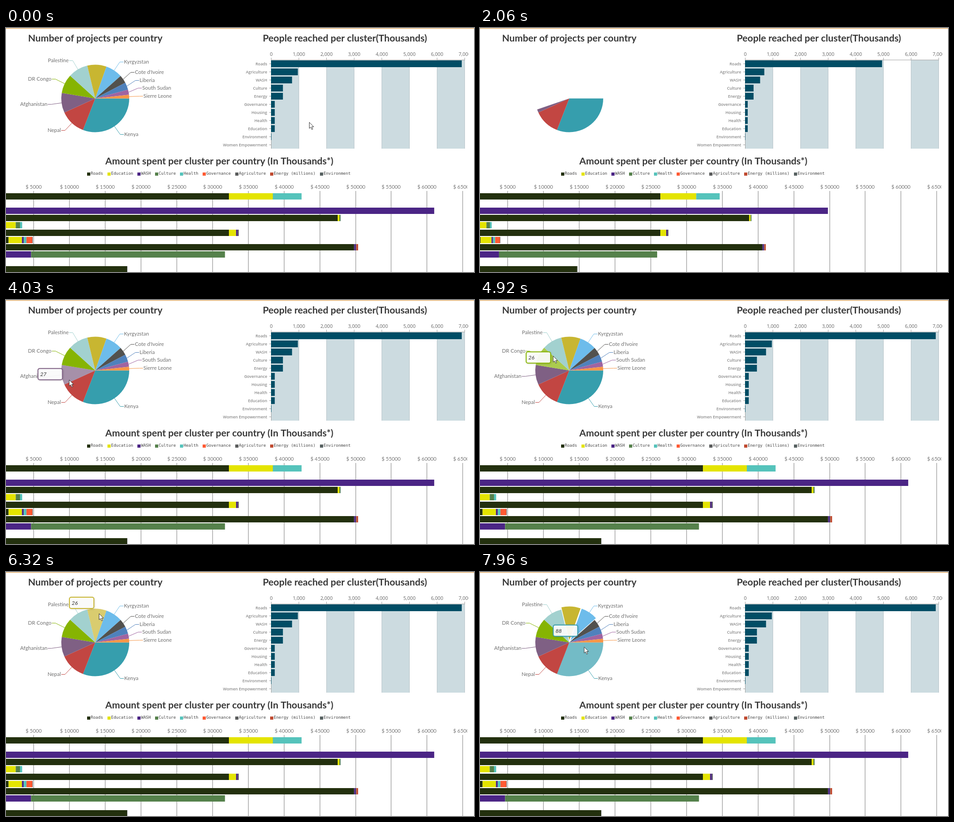
An HTML page with a canvas that plays this animation: 1033x542 px, repeating every 8 s.

```html
<!DOCTYPE html>
<html lang="en">
<head>
<meta charset="utf-8">
<title>Project dashboard</title>
<style>
  html, body { margin: 0; width: 100%; height: 100%; overflow: hidden; background: #fff; }
  canvas { display: block; }
</style>
</head>
<body>
<canvas id="stage" width="1033" height="542"></canvas>
<script>
const ctx = document.getElementById('stage').getContext('2d');
const LOOP = 8000;
const TAU = Math.PI * 2;
const TITLE = 'bold 21.15px Lato, sans-serif';
const LABEL = '11.5px Lato, sans-serif';
const TICK = '10.7px "Open Sans", sans-serif';
const ROW = '600 8.8px "Open Sans", sans-serif';
const LEGEND = '9px "DejaVu Sans Mono", monospace';

const clamp = v => Math.max(0, Math.min(1, v));
const progress = (t, start, length) => clamp((t - start) / length);
const easeOutQuart = p => 1 - (1 - p) ** 4;

// Times at which the charts are cleared and drawn again
const CLEARED = 1450, REDRAWN = 1510;
const PIE_START = 1508, PIE_TIME = 1237;
const SPEND_START = 1647, REACH_START = 1735, BAR_TIME = 1200;

const PIE = { x: 197, y: 156.5, r: 75 };
const clicks = { 'Timor Leste': 6480, 'Kyrgyzstan': 7280 };
const slices = [
  ['Kenya', 88, '#369ead'], ['Nepal', 35, '#c24642'], ['Afghanistan', 27, '#7f6084'],
  ['DR Congo', 26, '#86b402'], ['Palestine', 27, '#a2d1cf'], ['Timor Leste', 26, '#c8b631'],
  ['Kyrgyzstan', 23, '#6dbceb'], ["Cote d'Ivoire", 11, '#52514e'], ['Liberia', 10, '#4f81bc'],
  ['South Sudan', 7, '#a064a1'], ['Sierre Leone', 5, '#f79647']
].map(([name, value, color]) => ({ name, value, color }));

const reach = {
  'Roads': 6900, 'Agriculture': 970, 'WASH': 760, 'Culture': 430, 'Energy': 430,
  'Governance': 135, 'Housing': 135, 'Health': 135, 'Education': 135,
  'Environment': 15, 'Women Empowerment': 0
};

const clusters = {
  'Roads': '#23300e', 'Education': '#e4e400', 'WASH': '#4b2585', 'Culture': '#55814b',
  'Health': '#55c3bb', 'Governance': '#ff5a33', 'Agriculture': '#5a5c5c',
  'Energy (millions)': '#c04a30', 'Environment': '#566060'
};

// One stacked bar per country, in thousands of dollars
const spending = [
  { Roads: 32.3, Education: 6.14, Health: 4.02 },
  {},
  { WASH: 61 },
  { Roads: 47.5, Education: .25, Culture: .16 },
  { Education: 2.5, Culture: .6, Health: .3 },
  { Roads: 32.3, Education: 1, WASH: .25, Agriculture: .13 },
  { Roads: 1.5, Education: 1.87, WASH: .25, Health: .38, Governance: .82, Agriculture: .06 },
  { Roads: 49.8, WASH: .25, Agriculture: .06, 'Energy (millions)': .25 },
  { WASH: 4.65, Culture: 27.1 },
  {},
  { Roads: 18.05, Agriculture: .06 }
];

// time, x, y of the pointer tip
const pointerPath = [
  [0, 669, 209], [69, 669, 209], [70, 314, 10], [150, 314, 10], [430, 137, 0],
  [500, 137, -25], [2500, -30, -25], [2660, -8, 28], [3080, -6, 73], [3830, 129, 209],
  [4050, 140, 174], [4400, 178, 203], [4720, 178, 203], [4920, 161, 124], [5300, 195, 106],
  [5500, 181, 106], [6000, 213, 94], [6200, 205, 92], [6500, 205, 92], [7030, 238, 108],
  [7330, 238, 108], [7700, 219, 120], [8000, 231, 173]
];

function layOutPie() {
  const total = slices.reduce((sum, s) => sum + s.value, 0);
  let angle = 0;
  for (const s of slices) {
    s.from = angle;
    s.to = angle += s.value / total * TAU;
    s.mid = (s.from + s.to) / 2;
    s.side = Math.cos(s.mid) > 0 ? 1 : -1;
  }
  // Labels sit on a wider circle; crowded ones at the upper right move up
  const radius = PIE.r * 1.3, gap = 17.5;
  let lowest = 0;
  for (const s of [...slices].reverse()) {
    s.labelY = radius * Math.sin(s.mid);
    if (s.side > 0 && s.labelY < 0) {
      s.labelY = Math.min(s.labelY, lowest);
      lowest = s.labelY - gap;
    }
    s.labelX = s.side * Math.sqrt(radius ** 2 - s.labelY ** 2);
  }
}

function pointerAt(t) {
  const i = Math.max(1, pointerPath.findIndex(k => k[0] >= t));
  const [t0, x0, y0] = pointerPath[i - 1], [t1, x1, y1] = pointerPath[i];
  const p = progress(t, t0, t1 - t0);
  return { x: x0 + (x1 - x0) * p, y: y0 + (y1 - y0) * p };
}

function rect(color, x, y, w, h) {
  ctx.fillStyle = color;
  ctx.fillRect(x, y, w, h);
}

function text(str, x, y, font, color, align = 'center') {
  ctx.font = font;
  ctx.fillStyle = color;
  ctx.textAlign = align;
  ctx.fillText(str, x, y);
}

function polyline(color, ...points) {
  ctx.beginPath();
  points.forEach(([x, y]) => ctx.lineTo(x, y));
  ctx.strokeStyle = color;
  ctx.lineWidth = 1;
  ctx.stroke();
}

function clipped(right, draw) {
  ctx.save();
  ctx.beginPath();
  ctx.rect(0, 0, right, 542);
  ctx.clip();
  draw();
  ctx.restore();
}

function sliceUnder({ x, y }) {
  const dx = x - PIE.x, dy = y - PIE.y;
  if (Math.hypot(dx, dy) > PIE.r) return null;
  const angle = (Math.atan2(dy, dx) + TAU) % TAU;
  return slices.find(s => angle < s.to);
}

function drawPie(t, sweep, hovered) {
  for (const s of slices) {
    if (s.from >= sweep) break;
    const click = clicks[s.name] ?? LOOP;
    const push = 5 * easeOutQuart(progress(t, click, 300));
    const x = PIE.x + push * Math.cos(s.mid), y = PIE.y + push * Math.sin(s.mid);
    ctx.beginPath();
    ctx.moveTo(x, y);
    ctx.arc(x, y, PIE.r, s.from, Math.min(s.to, sweep));
    ctx.closePath();
    ctx.fillStyle = s.color;
    ctx.fill();
    if (s === hovered) {
      ctx.fillStyle = 'rgba(255,255,255,.3)';
      ctx.fill();
    }
  }
}

function drawPieLabels(alpha) {
  ctx.save();
  ctx.globalAlpha = alpha;
  for (const s of slices) {
    const edge = [PIE.x + PIE.r * Math.cos(s.mid), PIE.y + PIE.r * Math.sin(s.mid)];
    const x = PIE.x + s.labelX, y = Math.floor(PIE.y + s.labelY) + .5;
    polyline(s.color, edge, [x, y], [x + s.side * 8, y]);
    text(s.name, x + s.side * 9, y + 3, LABEL, '#707070', s.side > 0 ? 'left' : 'right');
  }
  ctx.restore();
}

function drawReach(scale) {
  const left = 585, top = 71, unit = 61, axis = '#a0a0a0';
  for (let k = 0; k < 7; k += 2) rect('#ccdbe0', left + k * unit, top, unit, 197);
  for (let k = 0; k <= 7; k++) {
    const x = left + k * unit;
    rect(k ? '#b9c5ca' : axis, x, top, 1, 197);
    rect(axis, x, 66, 1, 5);
    clipped(1021, () => text(k ? k + ',000' : '0', x + .5, 62, TICK, '#666'));
  }
  rect(axis, left, 70.5, 428, 1);
  Object.entries(reach).forEach(([name, value], i) => {
    const y = 79 + i * 18;
    rect(axis, 581, y, 4, 1);
    rect('#014d65', left, y - 7, value / 1000 * unit * scale, 15);
    text(name, 576.5, y + 3.5, ROW, '#8a8a8a', 'right');
  });
}

function drawLegend() {
  let x = 179;
  for (const [name, color] of Object.entries(clusters)) {
    rect(color, Math.round(x), 321, 7, 7);
    text(name, Math.round(x) + 8, 326, LEGEND, '#444', 'left');
    x += ctx.measureText(name).width + 17.5;
  }
}

// Dollar axis: position of a value in thousands
const dollarX = value => -18 + value * 15.79;

function drawSpendingFrame() {
  text('Amount spent per cluster per country (In Thousands*)', 471, 303, TITLE, '#383838');
  drawLegend();
  clipped(1018, () => {
    for (let value = 5; value <= 65; value += 5) {
      const x = Math.round(dollarX(value));
      rect('#bbb', x - 1, 362, 2, 180);
      text('$ ' + value * 1000, x, 356.5, '11.3px Lato, sans-serif', '#777');
    }
  });
}

function drawSpending(scale) {
  spending.forEach((amounts, row) => {
    let sum = 0;
    for (const [name, amount] of Object.entries(amounts)) {
      const x = dollarX(sum * scale);
      sum += amount;
      rect(clusters[name], x, Math.round(366.6 + row * 16.2), dollarX(sum * scale) - x, 14);
    }
  });
}

function drawTooltip(slice, { x, y }) {
  ctx.save();
  ctx.beginPath();
  ctx.roundRect(x - 65, y - 36, 54, 25, 4);
  ctx.shadowColor = 'rgba(0,0,0,.25)';
  ctx.shadowBlur = 4;
  ctx.shadowOffsetX = ctx.shadowOffsetY = 1;
  ctx.fillStyle = 'rgba(255,255,255,.92)';
  ctx.fill();
  ctx.shadowColor = 'transparent';
  ctx.strokeStyle = slice.color;
  ctx.lineWidth = 2;
  ctx.stroke();
  text(slice.value, x - 60, y - 19, 'italic 12px Lato, sans-serif', '#333', 'left');
  ctx.restore();
}

const arrow = new Path2D('M.5 .5V14L3.6 11.2 6 16.5 8.2 15.5 5.9 10.4H10.2Z');
function drawPointer({ x, y }) {
  ctx.save();
  ctx.translate(x, y);
  ctx.fillStyle = '#fff';
  ctx.fill(arrow);
  ctx.strokeStyle = '#333';
  ctx.lineWidth = 1;
  ctx.stroke(arrow);
  ctx.restore();
}

function draw(t) {
  const resting = t < CLEARED;
  const grown = start => resting ? 1 : easeOutQuart(progress(t, start, BAR_TIME));
  const pointer = pointerAt(t);
  const hovered = sliceUnder(pointer);

  rect('#fff', 0, 0, 1033, 542);
  rect('#ecc593', 0, 0, 1033, 2);
  drawSpendingFrame();
  drawSpending(grown(SPEND_START));

  if (resting || t >= REDRAWN) {
    text('Number of projects per country', 197, 29.5, TITLE, '#383838');
    text('People reached per cluster(Thousands)', 748, 29.5, TITLE, '#383838');
    drawReach(grown(REACH_START));
    drawPie(t, resting ? TAU : TAU * progress(t, PIE_START, PIE_TIME), hovered);
    drawPieLabels(resting ? 1 : progress(t, PIE_START + PIE_TIME, 200));
  }
  // The tooltip trails the pointer slightly
  if (hovered) drawTooltip(hovered, pointerAt(t - 70));
  drawPointer(pointer);
}

layOutPie();
const began = performance.now();
function tick() {
  draw((performance.now() - began) % LOOP);
  requestAnimationFrame(tick);
}
tick();
</script>
</body>
</html>
```
